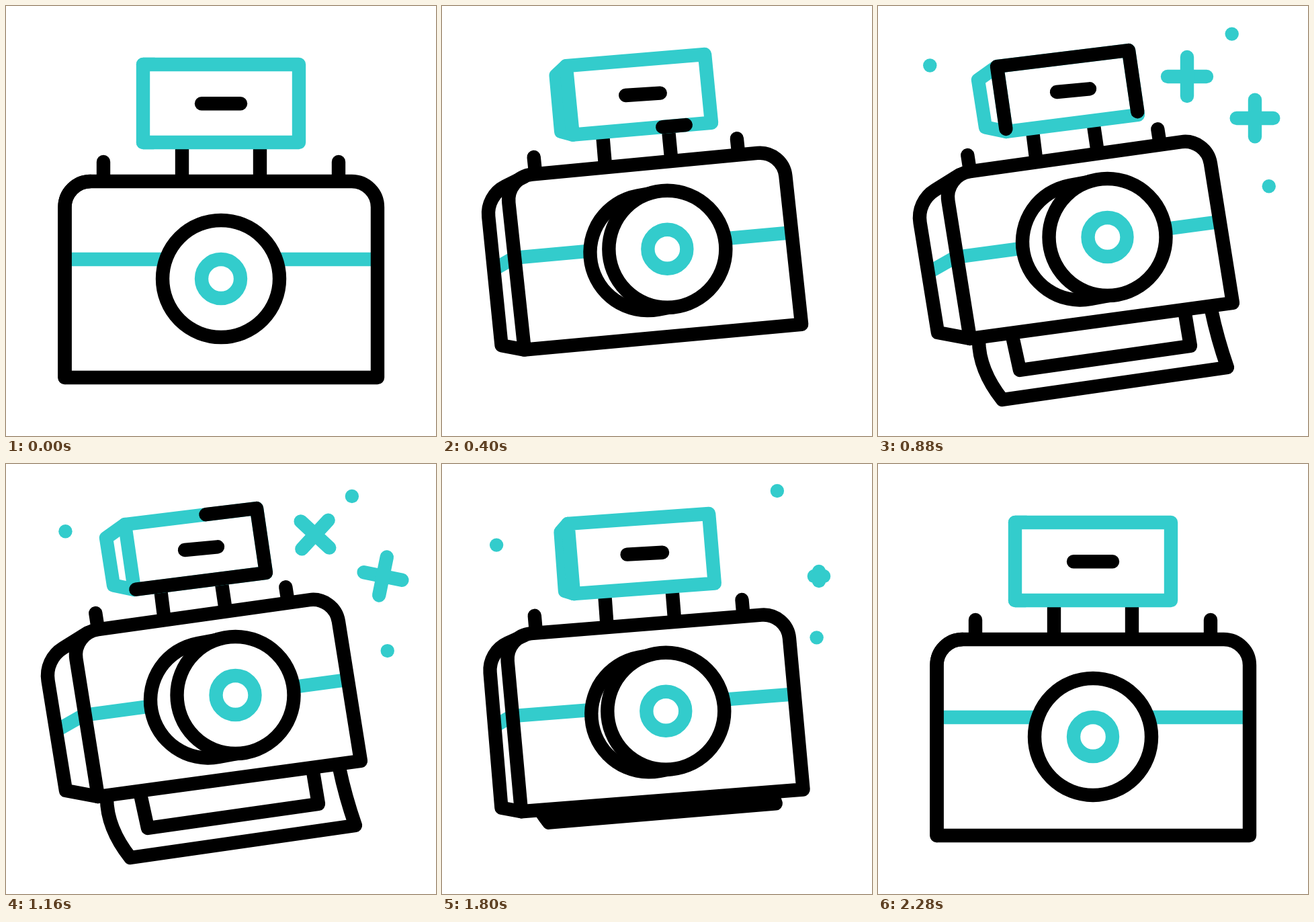
Write an HTML page with a canvas that moves like this. It is 640 px wide and 640 px high and loops after 2600 ms.

```html
<!DOCTYPE html>
<html lang="en">
<head>
<meta charset="utf-8">
<title>Instant camera</title>
<style>
  html, body { margin: 0; width: 100%; height: 100%; overflow: hidden; background: #fff; }
  canvas { display: block; width: 100vw; height: 100vh; }
</style>
</head>
<body>
<canvas id="stage" width="640" height="640"></canvas>
<script>
const ctx = document.getElementById('stage').getContext('2d');
const LOOP = 2600, STEP = 40, LINE = 20.4;
const INK = '#000', TEAL = '#33cccc', WHITE = '#fff';

// Progress and easing
const phase = (t, start, length) => Math.min(1, Math.max(0, (t - start) / length));
const smooth = u => u * u * (3 - 2 * u);
const settle = u => smooth(1 - (1 - u) ** 1.5);
const easeIn = u => u * u;
const easeOut = u => 1 - (1 - u) ** 2;
const lerp = (a, b, u) => a + (b - a) * u;
const mix = (a, b, u) => a.map((pt, i) => [lerp(pt[0], b[i][0], u), lerp(pt[1], b[i][1], u)]);

// Drawing helpers
function trace(pts, closed) {
  ctx.beginPath();
  for (const pt of pts) ctx.lineTo(...pt);
  if (closed) ctx.closePath();
}

function disc([x, y], r) {
  ctx.beginPath();
  ctx.arc(x, y, r, 0, 2 * Math.PI);
}

function stroke(color = INK, cap = 'round', width = LINE) {
  ctx.strokeStyle = color;
  ctx.lineCap = cap;
  ctx.lineJoin = 'round';
  ctx.lineWidth = width;
  ctx.stroke();
}

function fill(color) {
  ctx.fillStyle = color;
  ctx.fill();
}

function line(pts, color, cap, width) {
  trace(pts);
  stroke(color, cap, width);
}

// Part of a parabola that ends at the tip and grows out of the root.
function leg([x, y], width, height, bend, u) {
  const steep = width * (1 + bend) * u;
  return {
    root: [x, y],
    bend: [x + steep - width * bend * u * u - steep / 2, y + height * u / 2],
    tip: [x + steep - width * bend * u * u, y + height * u]
  };
}

function drawU(left, right) {
  ctx.beginPath();
  ctx.moveTo(...left.root);
  ctx.quadraticCurveTo(...left.bend, ...left.tip);
  ctx.lineTo(...right.tip);
  ctx.quadraticCurveTo(...right.bend, ...right.root);
  stroke();
}

function drawPrint(p, out) {
  if (out <= 0) return;
  const [a, b, c, d] = mix([[145, 553], [485, 553], [170, 553], [424, 553]],
    [[150, 497], [496, 452], [199, 487], [456, 452]], p);
  drawU(leg(a, 35, 89, 1, out), leg(b, 24, 86, .25, out));
  const drop = 1 - 89 / 55 * (1 - out);
  if (drop > 0) drawU(leg(c, 12, 55, 0, drop), leg(d, 9, 54, 0, drop));
}

function drawFittings(p) {
  const post = (a, b) => line(mix(a, b, p), INK, 'butt');
  const pin = (a, b) => line(mix(a, b, p));
  post([[262, 203], [262, 261]], [[229.5, 182], [235.5, 230]]);
  post([[378, 203], [378, 261]], [[320, 171], [326.5, 215]]);
  pin([[145, 232], [145, 261]], [[133.3, 222], [137, 246]]);
  pin([[495, 232], [495, 261]], [[416.3, 183.3], [420, 207]]);
}

function drawBody(p) {
  const [bl, tl, tr, br] = mix([[87.5, 553], [87.5, 261], [553, 261], [553, 553]],
    [[137, 495], [98.3, 251.7], [489, 197], [528, 442]], p);
  const [sideLow, sideTop, sideEnd] = mix([[87.5, 553], [87.5, 261], [126, 261]],
    [[89, 486], [57.5, 291], [122, 251]], p);
  const front = () => {
    ctx.beginPath();
    ctx.moveTo(...bl);
    ctx.arcTo(...tl, ...tr, 38.5);
    ctx.arcTo(...tr, ...br, 38.5);
    ctx.lineTo(...br);
    ctx.closePath();
  };
  front();
  fill(WHITE);
  line(mix([[87.5, 377], [87.5, 377], [553, 377]], [[74.5, 397], [115, 374], [509, 321]], p), TEAL, 'butt');
  ctx.beginPath();
  ctx.moveTo(...bl);
  ctx.lineTo(...sideLow);
  ctx.arcTo(...sideTop, ...sideEnd, lerp(38.5, 48, p));
  ctx.lineTo(...sideEnd);
  stroke();
  front();
  stroke();
}

function drawLens(p) {
  const [back, front] = mix([[320, 406], [320.01, 406]], [[301, 351.5], [341.5, 344]], p);
  line([back, front], INK, 'round', 2 * 86 + LINE);
  line([back, front], WHITE, 'round', 2 * 86 - LINE);
  disc(front, 87);
  fill(WHITE);
  stroke();
  disc(front, 29);
  stroke(TEAL);
}

// Corners run clockwise from the lower right; the trace passes the lower edge twice.
function drawTrace(corners, from, to) {
  if (to <= from) return;
  const sideLength = i => i % 2 ? 97 : 198;
  const run = [];
  for (let i = 0, dist = 0; i < 5; dist += sideLength(i++)) {
    const pair = [corners[i % 4], corners[(i + 1) % 4]];
    const u = phase(from, dist, sideLength(i)), v = phase(to, dist, sideLength(i));
    if (v > u) for (const w of [u, v]) run.push(...mix([pair[0]], [pair[1]], w));
  }
  line(run);
}

function drawFlash(p, t) {
  const corners = mix([[436, 203], [204, 203], [204, 87], [436, 87]],
    [[387, 162], [191, 187], [177, 90], [373, 66]], p);
  const [low, high] = mix([[220, 203], [221, 87]], [[160, 180.5], [149, 110]], p);
  trace([corners[1], low, high, corners[2]]);
  fill(WHITE);
  stroke(TEAL);
  trace(corners, true);
  fill(WHITE);
  stroke(TEAL);
  line(mix([[291, 145.3], [349, 145.3]], [[266, 128], [315, 123.3]], p));
  drawTrace(corners, lerp(34, 788, easeIn(phase(t, 330, 1165))), lerp(34, 788, smooth(phase(t, 280, 910))));
}

// A dot visits the corners of a small triangle and returns home.
function drawDot(home, right, low, t) {
  const stops = [home, right, low, home];
  let at = home;
  for (let i = 0; i < 3; i++) {
    const u = smooth(phase(t, 440 + 593 * i, 240));
    if (u > 0) [at] = mix([stops[i]], [stops[i + 1]], u);
  }
  const size = phase(t, 430, 60) - phase(t, 1810, 60);
  if (size <= 0) return;
  disc(at, LINE / 2 * size);
  fill(TEAL);
}

function drawCross(x, y, t) {
  const arm = 29 * (smooth(phase(t, 440, 340)) - smooth(phase(t, 1420, 340)));
  if (arm <= 0) return;
  const turn = Math.PI / 2 * smooth(phase(t, 880, 580));
  for (const a of [turn, turn + Math.PI / 2]) {
    const dx = arm * Math.cos(a), dy = arm * Math.sin(a);
    line([[x - dx, y - dy], [x + dx, y + dy]], TEAL);
  }
}

function draw(t) {
  const turn = settle(phase(t, 40, 720)) - settle(phase(t, 1580, 720));
  const out = easeOut(phase(t, 410, 310)) - smooth(phase(t, 1590, 285));
  ctx.fillStyle = WHITE;
  ctx.fillRect(0, 0, 640, 640);
  drawPrint(turn, out);
  drawFittings(turn);
  drawBody(turn);
  drawLens(turn);
  drawFlash(turn, t);
  drawDot([497.5, 37], [526.7, 41.6], [505, 53.3], t);
  drawDot([77.3, 123], [77.3, 88.5], [97.8, 110], t);
  drawDot([558, 252], [581.8, 268.3], [556, 286.3], t);
  drawCross(460, 105, t);
  drawCross(561, 167, t - 150);
}

const start = performance.now();
function tick() {
  const t = (performance.now() - start) % LOOP;
  draw(Math.floor(t / STEP) * STEP);
  requestAnimationFrame(tick);
}
tick();
</script>
</body>
</html>
```
